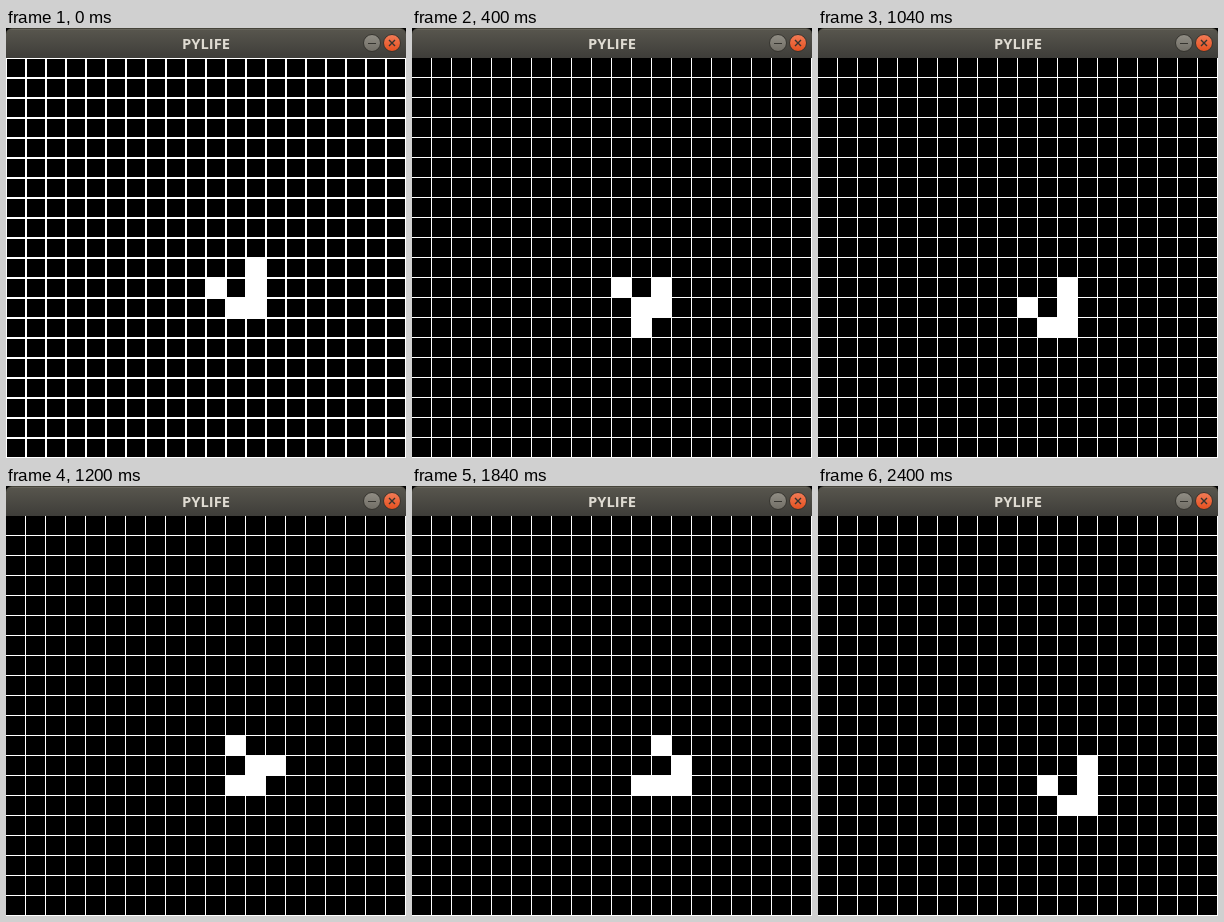
An HTML page with a canvas that plays this animation: 400x430 px, repeating every 2.8 s.

```html
<!DOCTYPE html>
<html lang="en">
<head>
<meta charset="utf-8">
<title>PYLIFE</title>
<style>
  html, body { margin: 0; width: 100%; height: 100%; overflow: hidden; background: #000; }
  header {
    position: absolute; left: 0; top: 0; width: 400px; height: 30px; box-sizing: border-box;
    border-top: 1px solid #454339; border-radius: 6px 6px 0 0;
    background: linear-gradient(#66645b 0 1px, #57554d 1px, #3e3d39 100%);
    color: #dfdbd2; font: bold 14.7px/28px "Open Sans", sans-serif; text-align: center;
  }
  svg { position: absolute; left: 356px; top: 5px; }
  canvas { position: absolute; left: 0; top: 30px; }
</style>
</head>
<body>
<header>PYLIFE</header>
<svg width="40" height="20" fill="none" stroke="#35342f">
  <defs>
    <linearGradient id="grey" x2="0" y2="1"><stop stop-color="#918e85"/><stop offset="1" stop-color="#716e66"/></linearGradient>
    <linearGradient id="orange" x2="0" y2="1"><stop stop-color="#f37c57"/><stop offset="1" stop-color="#e5501f"/></linearGradient>
  </defs>
  <circle cx="10" cy="10" r="8.5" fill="url(#grey)"/>
  <path d="M6 10.5h8"/>
  <circle cx="30" cy="10" r="8.5" fill="url(#orange)"/>
  <path d="M27 7l6 6m0-6l-6 6" stroke-width="1.4"/>
</svg>
<canvas width="400" height="400"></canvas>
<script>
const CELL = 20, COUNT = 20, STEP = 400, STEPS = 7;
const ctx = document.querySelector("canvas").getContext("2d");

// Patterns are lists of [column, row].
const opening = [[12, 10], [10, 11], [12, 11], [11, 12], [12, 12]];
const seed = [[10, 11], [12, 11], [11, 12], [12, 12], [11, 13]];

function nextGeneration(live) {
  const alive = new Set(live.map(String));
  const next = [];
  for (let y = 0; y < COUNT; y++) {
    for (let x = 0; x < COUNT; x++) {
      let near = 0;
      for (let dy = -1; dy <= 1; dy++)
        for (let dx = -1; dx <= 1; dx++)
          if ((dx || dy) && alive.has(`${x + dx},${y + dy}`)) near++;
      if (near === 3 || (near === 2 && alive.has(`${x},${y}`))) next.push([x, y]);
    }
  }
  return next;
}

const generations = [opening, seed];
while (generations.length < STEPS) generations.push(nextGeneration(generations.at(-1)));

function draw(step) {
  // The opening grid outlines every cell; later ones share single lines.
  const inset = step === 0 ? 1 : 0;
  const size = CELL - 1 - inset;
  ctx.fillStyle = "#fff";
  ctx.fillRect(0, 0, 400, 400);
  ctx.fillStyle = "#000";
  for (let y = 0; y < COUNT; y++)
    for (let x = 0; x < COUNT; x++)
      ctx.fillRect(x * CELL + inset, y * CELL + inset, size, size);
  ctx.fillStyle = "#fff";
  for (const [x, y] of generations[step]) ctx.fillRect(x * CELL, y * CELL, CELL, CELL);
}

let shown = 0;
draw(shown);
const start = performance.now();
function tick() {
  const step = Math.floor((performance.now() - start) / STEP) % STEPS;
  if (step !== shown) draw(shown = step);
  requestAnimationFrame(tick);
}
requestAnimationFrame(tick);
</script>
</body>
</html>
```
